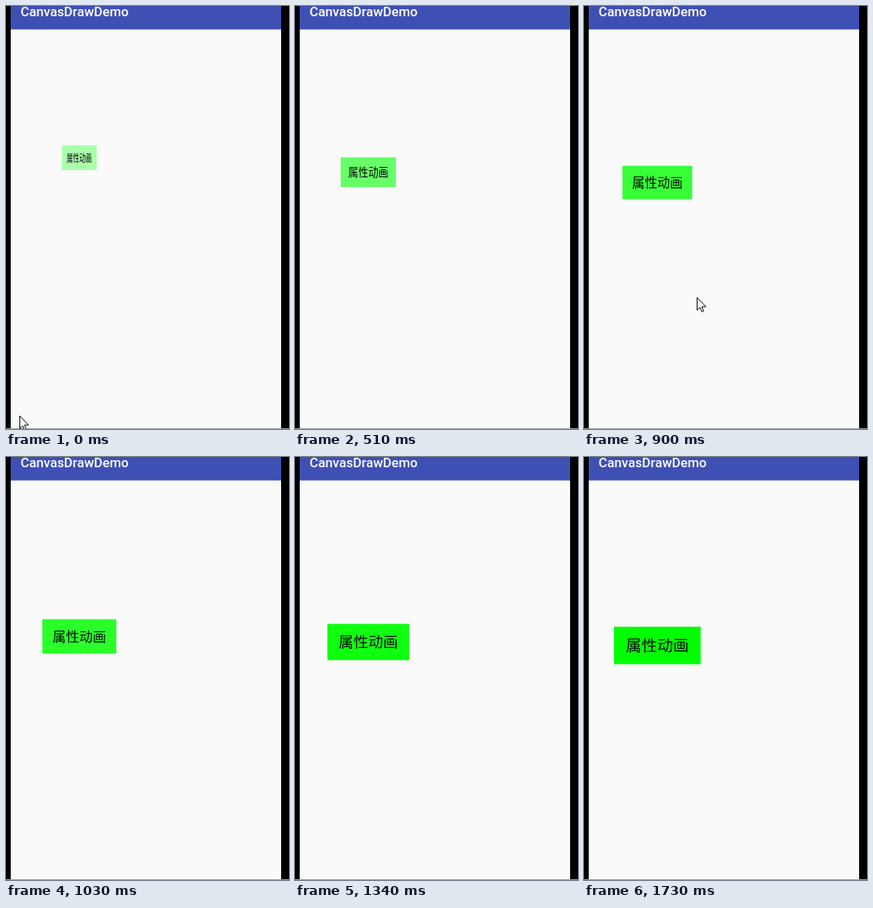
Recreate the animation shown at these times as an HTML page. Size 359x536 px, loop 3.28 s.

```html
<!DOCTYPE html>
<html lang="zh">
<head>
<meta charset="utf-8">
<title>CanvasDrawDemo</title>
<style>
  html, body { margin: 0; width: 100%; height: 100%; overflow: hidden; background: #000; }
  svg { display: block; width: 359px; height: 536px; }
  .title { font: 500 16.7px Roboto, sans-serif; fill: #fff; }
  .label { font: 400 19px "Noto Sans CJK SC", "Noto Sans CJK", sans-serif; text-anchor: middle; fill: #080808; }
</style>
</head>
<body>
<svg viewBox="0 0 359 536">
  <rect width="359" height="536" fill="#000"/>
  <rect x="6" width="343" height="535" fill="#fafafa"/>
  <rect x="6" width="343" height="29.7" fill="#3f50b4"/>
  <text class="title" x="18.6" y="13.4">CanvasDrawDemo</text>
  <rect y="535" width="359" height="1" fill="#a0a0a0"/>
  <g id="button">
    <rect id="face" x="-55" y="-23.75" width="110" height="47.5"/>
    <text class="label" transform="scale(1.05 1)" y="7">属性动画</text>
  </g>
  <path id="cursor" d="M.5 .5V16.5L4.2 13 6.6 18.5 8.8 17.6 6.5 12H11.6Z" fill="#fff" stroke="#000"/>
</svg>
<script>
  const LOOP = 3280;
  const STEPS = [0, 120, 240, 390, 510, 660, 780, 900, 1030, 1180, 1340, 1490, 1610, 1730];
  const CURSOR = { 0: [17, 519], 900: [143, 369] };
  const [button, face, cursor] = ['button', 'face', 'cursor'].map(id => document.getElementById(id));

  // The loop opens partway through a three-second ease-in-out.
  const progressAt = ms => ms >= 1730 ? 1 : 0.5 - 0.5 * Math.cos(Math.PI * (0.392 + ms / 3000));

  function draw(now) {
    const time = now % LOOP;
    const step = STEPS.findLast(start => start <= time);
    const p = progressAt(step);
    const tint = Math.round(255 * (1 - p));

    button.setAttribute('transform',
      `translate(93 ${168.9 + 69.9 * p}) scale(${0.1 + 0.9 * p} ${0.5 + 0.5 * p})`);
    face.setAttribute('fill', `rgb(${tint},255,${tint})`);

    const spot = CURSOR[step];
    cursor.setAttribute('visibility', spot ? 'visible' : 'hidden');
    if (spot) cursor.setAttribute('transform', `translate(${spot})`);
  }

  const origin = performance.now();
  function tick() {
    draw(performance.now() - origin);
    requestAnimationFrame(tick);
  }
  tick();
</script>
</body>
</html>
```
